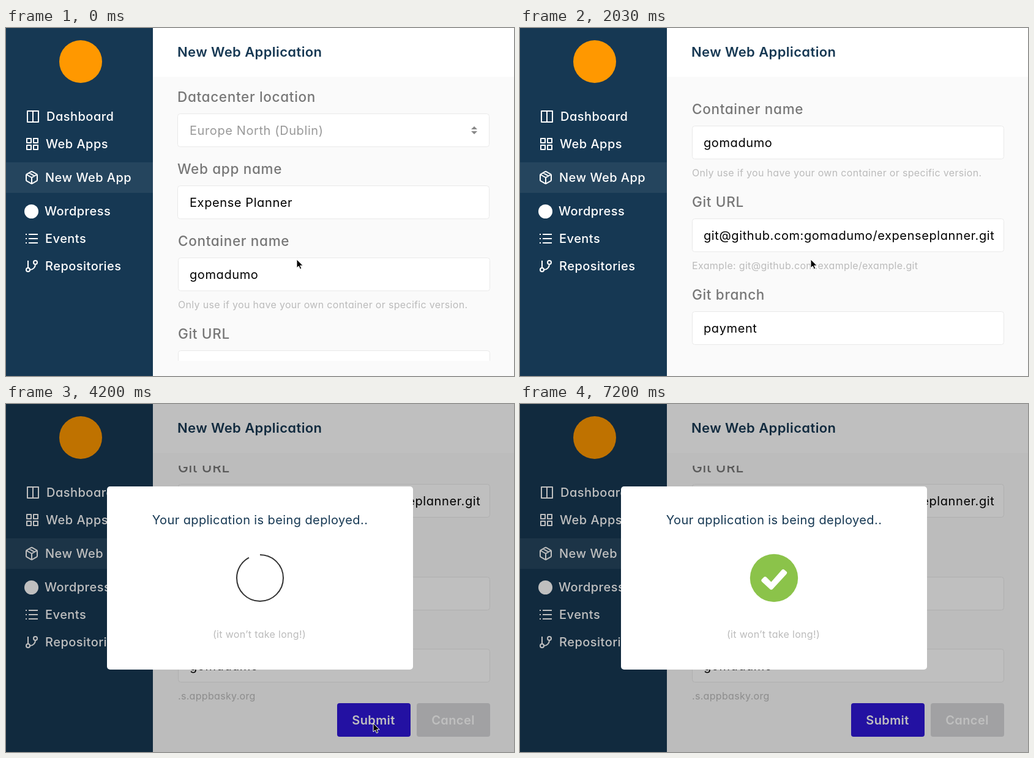
An HTML page for the animation above (7230 ms loop, 830x570 px).

```html
<!DOCTYPE html>
<html lang="en">
<head>
<meta charset="utf-8">
<title>New Web Application</title>
<style>
  html, body { margin: 0; width: 100%; height: 100%; overflow: hidden; background: #fafafa; }
  svg { display: block; }
  text { font: 400 20px Inter, "Open Sans", sans-serif; letter-spacing: .02em; font-feature-settings: "cv11"; white-space: pre; }
  .nav { font-weight: 500; fill: #fff; letter-spacing: .024em; }
  .title { font-size: 22px; font-weight: 600; fill: #163853; letter-spacing: .018em; }
  .label { font-size: 22.5px; font-weight: 500; fill: #777; letter-spacing: .03em; }
  .value { letter-spacing: .03em; }
  .hint { font-size: 16px; fill: #bbb; letter-spacing: .02em; }
  .note { font-size: 16px; fill: #bbb; text-anchor: middle; }
  .button { font-weight: 600; fill: #fff; text-anchor: middle; }
  .status { fill: #163853; text-anchor: middle; }
  .icon { fill: none; stroke: #fff; stroke-width: 2; stroke-linejoin: round; }
  .field { fill: #fff; stroke: #e9e9e9; }
</style>
</head>
<body>
<svg width="830" height="570" viewBox="0 0 830 570">
  <clipPath id="view"><rect x="240" y="101" width="590" height="444"/></clipPath>

  <rect width="830" height="570" fill="#fafafa"/>
  <rect x="240" width="590" height="80" fill="#fff"/>
  <text class="title" x="280" y="47">New Web Application</text>

  <g clip-path="url(#view)"><g id="form"></g></g>

  <rect width="240" height="570" fill="#163853"/>
  <rect y="220" width="240" height="50" fill="#25455e"/>
  <circle cx="122" cy="55" r="35" fill="#ff9800"/>
  <g class="icon">
    <path d="M35 136h18v18h-18zM44 136v18"/>
    <path d="M34 181h7v7h-7zM45 181h7v7h-7zM34 192h7v7h-7zM45 192h7v7h-7z"/>
    <path transform="translate(30 233)" d="M21 16V8a2 2 0 0 0-1-1.73l-7-4a2 2 0 0 0-2 0l-7 4A2 2 0 0 0 3 8v8a2 2 0 0 0 1 1.73l7 4a2 2 0 0 0 2 0l7-4A2 2 0 0 0 21 16zM3.3 7L12 12l8.7-5M12 22V12M16.5 9.4L7.5 4.2"/>
    <path d="M32 338h2M37 338h15M32 345h2M37 345h15M32 352h2M37 352h15"/>
    <path d="M36 381v12M48 387a9 9 0 0 1-9 9"/>
    <circle cx="48" cy="384" r="3"/><circle cx="36" cy="396" r="3"/>
  </g>
  <circle cx="41.5" cy="300.5" r="11.5" fill="#fff"/>
  <g id="menu"></g>

  <g id="modal">
    <rect width="830" height="570" fill="#000" opacity=".25"/>
    <rect x="165" y="135" width="500" height="300" rx="5" fill="#fff"/>
    <text class="status" x="415" y="197">Your application is being deployed..</text>
    <text class="note" x="414" y="383">(it won’t take long!)</text>
    <circle id="disc" cx="415" cy="285" r="39.2" fill="#8bc34a"/>
    <path id="ring" d="M415 247a38 38 0 0 1 0 76a38 38 0 0 1 0-76" pathLength="100" fill="none" stroke="#333" stroke-width="2"/>
    <path id="tick" d="M410.5 293L402 284.5Q400.5 283 399 284.5L396 287.5Q394.5 289 396 290.5L409 302.5Q410.5 304 412 302.5L434.5 278Q436 276.5 434.5 275L431.5 272.5Q430 271 428.5 272.5Z"
      pathLength="100" fill="#fff" stroke="#fff" stroke-width="1.9" stroke-linejoin="round"/>
  </g>

  <g id="cursor" stroke-linejoin="round">
    <path id="arrow" d="M0 0V14l3.3-3 2.2 5 2.4-1-2.2-4.800h4.500z" fill="#000" stroke="#fff"/>
    <path id="hand" d="M-1.5 9V1.5a1.5 1.5 0 0 1 3 0V6q1.5-1.5 2.7.3 1.6-1 2.6.6 2-.6 2.2 1.3v3.300l-1.500 3V17H-1v-2.500L-5 9q0-2 2-1z" fill="#fff" stroke="#000"/>
  </g>
</svg>

<script>
const LOOP = 7230;
const $ = id => document.getElementById(id);
const text = (cls, x, y, s) => `<text class="${cls}" x="${x}" y="${y}">${s}</text>`;

const menu = [
  [66, 145, 'Dashboard'], [65, 190, 'Web Apps'], [64, 245, 'New Web App'],
  [63, 300, 'Wordpress'], [64, 345, 'Events'], [64, 390, 'Repositories']
];
$('menu').innerHTML = menu.map(([x, y, s]) => text('nav', x, y + 7, s)).join('');

// left edge, field top, label, value, hint
const fields = [
  [280, 140, 'Datacenter location', 'Europe North (Dublin)'],
  [280, 258, 'Web app name', 'Expense Planner'],
  [281, 376, 'Container name', 'gomadumo', 'Only use if you have your own container or specific version.'],
  [281, 528, 'Git URL', 'git@github.com:gomadumo/expenseplanner.git', 'Example: git@github.com:example/example.git'],
  [281, 680, 'Git branch', 'payment'],
  [281, 798, 'Enter temporary domain', 'gomadumo', '.s.appbasky.org']
];
const button = (x, fill, s) =>
  `<rect x="${x}" y="887" width="120" height="55" rx="4" fill="${fill}"/>` + text('button', x + 59.5, 922, s);

$('form').innerHTML = fields.map(([x, y, label, value, hint], i) =>
  text('label', x, y - 19, label) +
  `<rect class="field" x="${x + .5}" y="${y + .5}" width="509" height="54" rx="4"/>` +
  `<g fill="${i ? '#000' : '#999'}">${text('value', 300, y + 34.5, value)}</g>` +
  (hint ? text('hint', x, y + 83, hint) : '')
).join('') +
  '<path d="M760 166l5-5 5 5zM760 169l5 5 5-5z" fill="#888"/>' +
  button(541, '#2f17d8', 'Submit') + button(671, '#d6d7d9', 'Cancel');

const smooth = p => p * p * (3 - 2 * p);
const ramp = (t, from, to) => Math.min(1, Math.max(0, (t - from) / (to - from)));

// value at time t along [time, value] steps
function track(t, steps) {
  let v = steps[0][1];
  for (let i = 1; i < steps.length; i++) {
    const [t0, a] = steps[i - 1], [t1, b] = steps[i];
    if (t >= t0) v = a + (b - a) * smooth(ramp(t, t0, t1));
  }
  return v;
}

const scroll = [[30, 0], [430, 90], [600, 90], [830, 110], [1600, 192], [1930, 192], [2400, 397]];
const cursorX = [[2330, 475], [2670, 578], [2880, 600]];
const cursorY = [[2330, 379], [2670, 497], [2880, 523]];

function draw() {
  const t = performance.now() % LOOP;
  const x = track(t, cursorX), y = track(t, cursorY);
  const hover = x > 541 && y > 490 && t < 3000;
  const fill = ramp(t, 4250, 4550);
  const line = smooth(ramp(t, 4500, 5280));

  $('form').setAttribute('transform', `translate(0 ${-Math.round(track(t, scroll))})`);
  $('cursor').setAttribute('transform', `translate(${x} ${y})`);
  $('cursor').style.display = t < 5430 ? '' : 'none';
  $('hand').style.display = hover ? '' : 'none';
  $('arrow').style.display = hover ? 'none' : '';

  $('modal').style.opacity = ramp(t, 3000, 3200);
  $('disc').style.opacity = fill;
  $('ring').style.opacity = t < 3280 ? 0 : 1 - fill;
  $('ring').style.strokeDasharray = `${100 * ramp(t, 3280, 4280)} 200`;
  $('tick').style.opacity = line > 0 ? 1 : 0;
  $('tick').style.strokeDasharray = line < 1 ? `${100 * line} 200` : 'none';
  $('tick').style.fillOpacity = ramp(t, 5700, 6400);
  requestAnimationFrame(draw);
}
draw();
</script>
</body>
</html>
```
